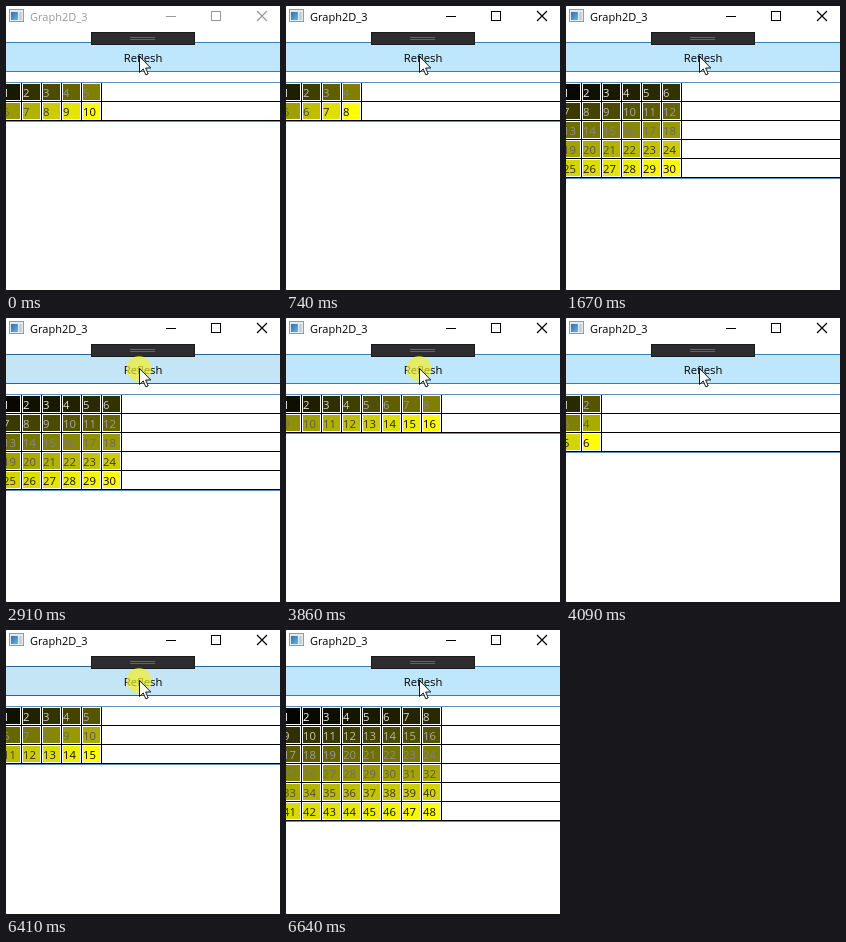
Recreate the animation shown at these times as an HTML page. Size 274 px wide and 284 px high, loop 8 s.

```html
<!DOCTYPE html>
<html lang="en">
<head>
<meta charset="utf-8">
<title>Graph2D_3</title>
<style>
  html, body { margin: 0; width: 100%; height: 100%; overflow: hidden; background: #fff; }
  svg { display: block; font: 11.3px "Open Sans", "Noto Sans", sans-serif; }
  .crisp { shape-rendering: crispEdges; }
  #caption { color: #000; }
  #caption.inactive { color: #999; }
  #button { fill: #bee6fd; stroke: #3c7fb1; }
  #button.pressed { fill: #c4e5f6; stroke: #2c628b; }
</style>
</head>
<body>
<svg width="274" height="284" viewBox="0 0 274 284">
  <defs>
    <linearGradient id="pane" x2="1" y2="1">
      <stop offset="0" stop-color="#2f6fb4"/>
      <stop offset="1" stop-color="#6fb0df"/>
    </linearGradient>
  </defs>

  <g class="crisp">
    <rect x="3.5" y="3.5" width="14" height="12" fill="#e6ebef" stroke="#929ca5"/>
    <rect x="5" y="6" width="7" height="8" fill="url(#pane)"/>
    <rect x="13" y="6" width="3" height="8" fill="#c9d0d6"/>
  </g>
  <g id="caption">
    <text x="24" y="14.5" font-size="11" fill="currentColor">Graph2D_3</text>
    <g fill="none" stroke="currentColor">
      <path class="crisp" d="M160 10.5h10M205.5 5.5h9v9h-9z"/>
      <path d="M251 5l10 10M261 5l-10 10" stroke-width="1.2"/>
    </g>
  </g>

  <rect id="button" class="crisp" x="-5.5" y="36.5" width="285" height="29"/>
  <text x="137" y="56" text-anchor="middle">Reflesh</text>
  <g class="crisp">
    <rect x="85.5" y="26.5" width="103" height="12" fill="#2d2d30" stroke="#1b1b1c"/>
    <path d="M124 31.5h25M124 33.5h25" stroke="#626267"/>
  </g>

  <g id="grid"></g>

  <circle id="halo" cx="133" cy="50.5" r="12.5" fill="#f4f020" fill-opacity=".68"/>
  <path d="M133.5 50.5v16l3.7-3.6 2.6 6 2.4-1-2.6-5.9h5.2z" fill="#fff" stroke="#000" stroke-width=".9"/>
</svg>

<script>
const DURATION = 8000;
const COL = 20, ROW = 19, LEFT = -4, TOP = 77, WIDTH = 274;

// Each click replaces the grid on release; the halo may lead the press or outlast the release.
const initial = { rows: 2, cols: 5 };
const clicks = [
  { press: 500, release: 670, tail: 70, rows: 2, cols: 4 },
  { press: 1590, release: 1670, lead: 70, rows: 5, cols: 6 },
  { press: 2910, release: 3080, rows: 2, cols: 8 },
  { press: 3930, release: 4010, lead: 70, tail: 80, rows: 3, cols: 2 },
  { press: 5250, release: 5480, rows: 3, cols: 5 },
  { press: 6410, release: 6560, tail: 80, rows: 6, cols: 8 },
];

const byId = id => document.getElementById(id);
const [caption, button, grid, halo] = ['caption', 'button', 'grid', 'halo'].map(byId);

const box = (x, y, w, h, fill) =>
  `<rect class="crisp" x="${x}" y="${y}" width="${w}" height="${h}" fill="${fill}"/>`;

function cell(index, count, cols) {
  const x = LEFT + index % cols * COL;
  const y = TOP + Math.floor(index / cols) * ROW;
  const level = Math.floor(255 * (index + 1) / count);
  const ink = 255 - level;
  return box(x + 1, y + 1, COL - 3, ROW - 3, `rgb(${level},${level},0)`) +
    `<text x="${x + 1}" y="${y + 14}" fill="rgb(${ink},${ink},${ink})">${index + 1}</text>`;
}

function table({ rows, cols }) {
  const count = rows * cols, height = rows * ROW;
  let out = box(0, TOP - 1, WIDTH, 1, '#688caf') + box(0, TOP + height, WIDTH, 1, '#688caf');
  for (let r = 1; r <= rows; r++) out += box(0, TOP + r * ROW - 1, WIDTH, 1, '#000');
  for (let c = 1; c <= cols; c++) out += box(LEFT + c * COL - 1, TOP, 1, height, '#000');
  for (let i = 0; i < count; i++) out += cell(i, count, cols);
  return out;
}

const start = performance.now();
let shown;

function frame() {
  const time = (performance.now() - start) % DURATION;
  const during = (from, to) => from <= time && time < to;
  const pressed = clicks.some(c => during(c.press, c.release));
  const glowing = clicks.some(({ press, release, lead = 0, tail = 0 }) =>
    during(press - lead, release + tail));
  const layout = clicks.findLast(c => c.release <= time) ?? initial;

  caption.classList.toggle('inactive', time < clicks[0].press);
  button.classList.toggle('pressed', pressed);
  halo.style.display = glowing ? '' : 'none';
  if (layout !== shown) grid.innerHTML = table(shown = layout);
  requestAnimationFrame(frame);
}
frame();
</script>
</body>
</html>
```
